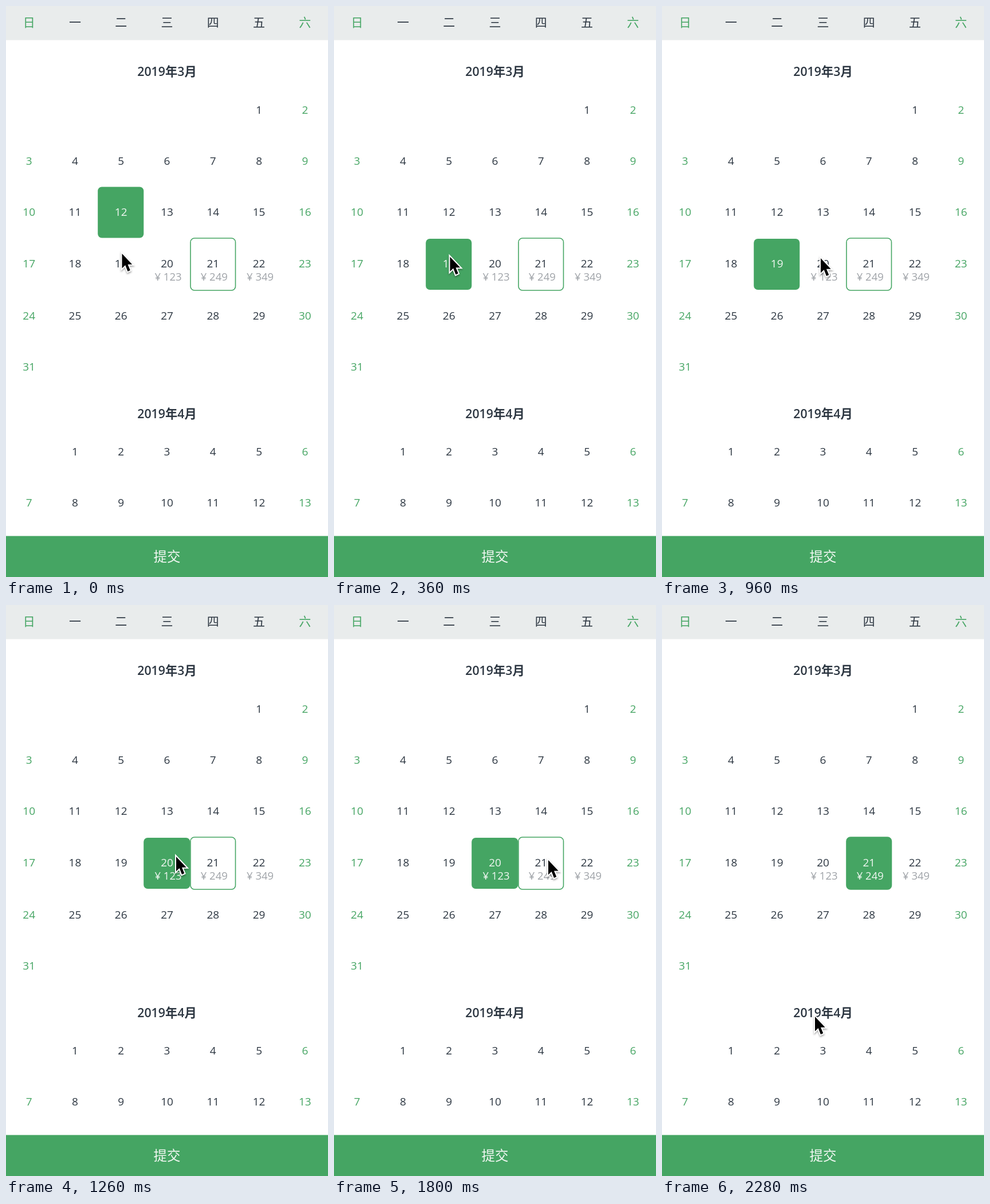
Write an HTML page that moves like this. It is 562 by 996 pixels and loops after 2340 ms.

```html
<!DOCTYPE html>
<html lang="zh-CN">
<head>
<meta charset="utf-8">
<style>
  html, body { margin: 0; width: 100%; height: 100%; overflow: hidden; background: #fff; }
  svg { display: block; width: 562px; height: 996px; }
  text { font: 19px "Open Sans", "Noto Sans CJK SC", sans-serif; text-anchor: middle; fill: #2c3641; }
  .week { font-size: 21px; }
  .title { font-size: 21.3px; font-weight: 600; }
  .weekend { fill: #45a563; }
  .price { font-size: 18.5px; fill: #9fa3a8; }
  .submit { font-size: 23.5px; fill: #f1f7f2; }
  .on text { fill: #f1f7f2; }
  .box { fill: none; }
  .on .box { fill: #45a563; }
  .today { stroke: #45a563; stroke-width: 1.6; }
  #cursor { filter: drop-shadow(0 2px 1.5px rgba(0, 0, 0, .35)); }
</style>
</head>
<body>
<svg id="stage" viewBox="0 0 562 996">
  <rect width="562" height="59.5" fill="#e9ecec"/>
  <rect y="924.5" width="562" height="72" fill="#45a563"/>
  <text class="submit" x="281" y="969">提交</text>
  <g id="calendar"></g>
  <path id="cursor" d="M0 0V25.5L5.7 20L10 31L14.3 29L10 18.7H17.7Z"
        stroke="#fff" stroke-width="4" paint-order="stroke"/>
</svg>
<script>
const calendar = document.getElementById('calendar');
const cursor = document.getElementById('cursor');
const COLUMN = 562 / 7, LOOP = 2340, STEP = 60;
const prices = { 20: 123, 21: 249, 22: 349 };
const marchCells = {};

function add(parent, tag, attrs, content = '') {
  const node = document.createElementNS('http://www.w3.org/2000/svg', tag);
  for (const name in attrs) node.setAttribute(name, attrs[name]);
  node.textContent = content;
  return parent.appendChild(node);
}

const columnX = column => (column + 0.5) * COLUMN;
const columnEdge = column => Math.floor(column * COLUMN);
const dayClass = column => column % 6 ? '' : 'weekend';

function addMonth(title, titleY, firstColumn, lastDay, rows, cells = {}) {
  add(calendar, 'text', { class: 'title', x: 281, y: titleY + 7.2 }, title);
  for (let day = 1; day <= lastDay; day++) {
    const slot = firstColumn + day - 1, column = slot % 7;
    const x = columnX(column), y = rows[Math.floor(slot / 7)];
    const cell = cells[day] = add(calendar, 'g', {});
    const isToday = cells === marchCells && day === 21;
    const inset = isToday ? 1 : 0.2, height = isToday ? 91 : 89;
    const left = columnEdge(column) + inset;
    add(cell, 'rect', {
      class: isToday ? 'box today' : 'box', rx: 7,
      x: left, y: y + 1 - height / 2,
      width: columnEdge(column + 1) - inset - left + 0.5, height
    });
    add(cell, 'text', { class: dayClass(column), x, y: y + 6.8 }, day);
    if (cells === marchCells && prices[day])
      add(cell, 'text', { class: 'price', x: x + 2, y: y + 29 }, '¥ ' + prices[day]);
  }
}

[...'日一二三四五六'].forEach((name, column) =>
  add(calendar, 'text', { class: 'week ' + dayClass(column), x: columnX(column), y: 36.3 }, name));
addMonth('2019年3月', 115, 5, 31, [181, 270, 359, 449.5, 540, 629], marchCells);
addMonth('2019年4月', 711.5, 1, 13, [777.5, 866.5]);

// time, x, y of the cursor tip
const track = [
  [0, 202.5, 432], [180, 202.5, 437.5], [600, 202.5, 437.5], [960, 277, 440], [1080, 297, 439],
  [1380, 297, 439], [1740, 374, 445], [2160, 374, 445], [2220, 332, 555], [2280, 267, 718]
];
// time, selected day
const selections = [[0, 12], [240, 19], [1200, 20], [1920, 21]];

function cursorAt(time) {
  const next = track.findIndex(key => key[0] > time);
  if (next < 0) return track.at(-1).slice(1);
  const [t0, x0, y0] = track[next - 1], [t1, x1, y1] = track[next];
  const k = (time - t0) / (t1 - t0);
  return [x0 + (x1 - x0) * k, y0 + (y1 - y0) * k];
}

function draw(now) {
  const time = Math.floor(now % LOOP / STEP) * STEP;
  const selected = selections.findLast(([start]) => start <= time)[1];
  for (const [, day] of selections)
    marchCells[day].setAttribute('class', day === selected ? 'on' : '');
  cursor.setAttribute('transform', `translate(${cursorAt(time)})`);
}

const start = performance.now();
function tick() {
  draw(performance.now() - start);
  requestAnimationFrame(tick);
}
tick();
</script>
</body>
</html>
```
